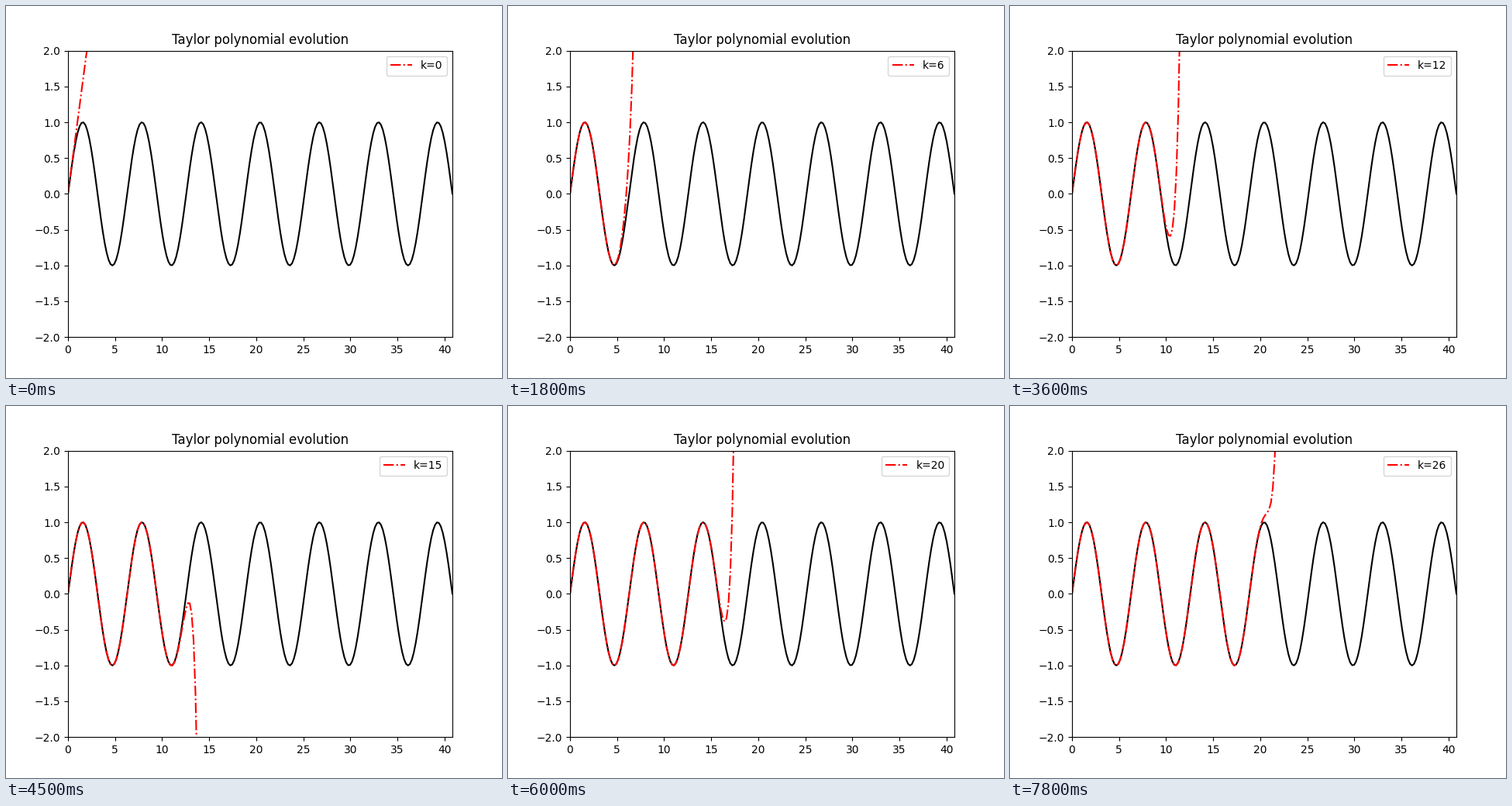
Write a matplotlib script that moves like this. It is 640x480 px and loops after 8 s.

```python
import math

import matplotlib.pyplot as plt
import numpy as np
from matplotlib.animation import FuncAnimation

INTERVAL = 100        # ms per tick
TICKS = 80            # 8000 ms loop
TICKS_PER_ORDER = 3   # a new term every 300 ms

x = np.linspace(0, 13 * math.pi, 200)


def taylor_sin(x, order):
    """Taylor polynomial of sin(x) around 0, terms 0..order."""
    term = x.copy()
    total = term.copy()
    for n in range(1, order + 1):
        term = -term * x**2 / (2 * n * (2 * n + 1))
        total += term
    return total


plt.rcParams["font.family"] = "DejaVu Sans"
fig, ax = plt.subplots(figsize=(6.4, 4.8), dpi=100)
ax.set_title("Taylor polynomial evolution")
ax.set_xlim(0, 13 * math.pi)
ax.set_ylim(-2, 2)
ax.plot(x, np.sin(x), color="black", linewidth=1.5)
approx, = ax.plot(x, x, color="red", linestyle="-.", linewidth=1.5, label="k=0")
label = ax.legend(loc="upper right").get_texts()[0]


def update(tick):
    order = tick // TICKS_PER_ORDER
    approx.set_ydata(taylor_sin(x, order))
    label.set_text(f"k={order}")
    return approx, label


anim = FuncAnimation(fig, update, frames=TICKS, interval=INTERVAL,
                     init_func=lambda: update(0), repeat=True, repeat_delay=0)
plt.show()
```
